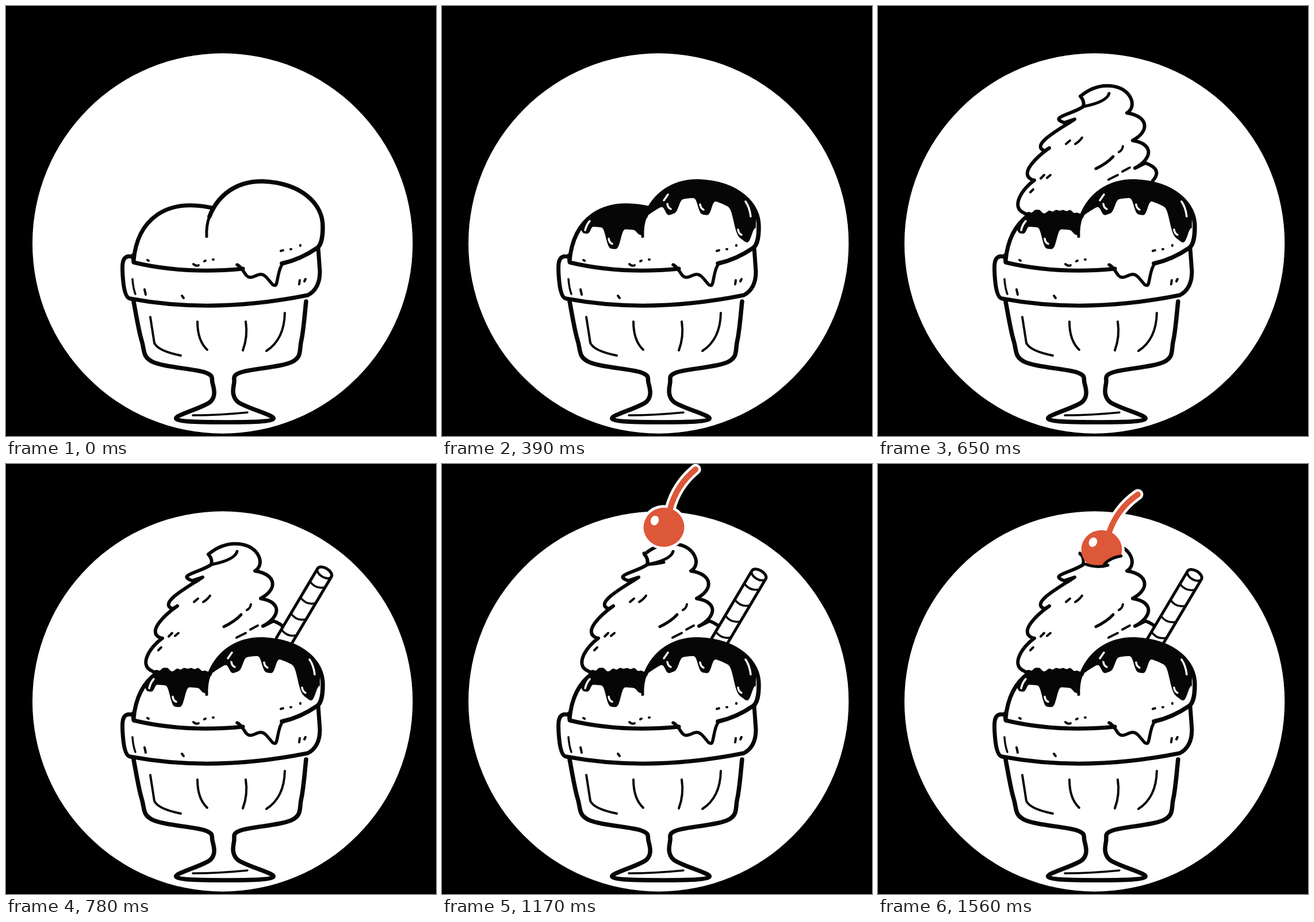
An HTML page with a canvas for the animation above (2.47 s loop, 748 by 748 pixels).

```html
<!DOCTYPE html>
<html lang="en">
<head>
<meta charset="utf-8">
<title>Ice cream sundae</title>
<style>
html, body { margin: 0; width: 100%; height: 100%; overflow: hidden; background: #000; }
canvas { display: block; width: 748px; height: 748px; }
</style>
</head>
<body>
<canvas id="stage" width="748" height="748"></canvas>
<script>
const ctx = document.getElementById('stage').getContext('2d');
const INK = '#060607', WHITE = '#fff', RED = '#dd5739';
const STEP = 130, LOOP = 2470, LAST_STEP = 12;

const asPath = shape => shape instanceof Path2D ? shape : new Path2D(shape);

function stroke(shape, width, color = INK) {
  ctx.lineWidth = width;
  ctx.strokeStyle = color;
  ctx.stroke(asPath(shape));
}

function fill(shape, color = WHITE) {
  ctx.fillStyle = color;
  ctx.fill(asPath(shape));
}

function isolated(paint) {
  ctx.save();
  paint();
  ctx.restore();
}

function ellipse(x, y, rx, ry, turn = 0) {
  const path = new Path2D();
  path.ellipse(x, y, rx, ry, turn, 0, Math.PI * 2);
  return path;
}

// Catmull-Rom curve through the given points.
function spline(pts) {
  const path = new Path2D();
  path.moveTo(...pts[0]);
  for (let i = 0; i < pts.length - 1; i++) {
    const b = pts[i], c = pts[i + 1];
    const a = pts[i - 1] || b, d = pts[i + 2] || c;
    path.bezierCurveTo(
      b[0] + (c[0] - a[0]) / 6, b[1] + (c[1] - a[1]) / 6,
      c[0] - (d[0] - b[0]) / 6, c[1] - (d[1] - b[1]) / 6, ...c);
  }
  return path;
}

// Scoops and the sauce hanging over them
const leftScoop = {
  edge: 'M222 443C228 375 275 330 366 353',
  close: 'L366 458L222 446Z',
  top: [300, 345], from: 237, to: 356,
  base: x => 386 + 0.08 * (x - 290),
  drips: [{ x: 250, length: 13, width: 9 }, { x: 298, length: 36, width: 14 }, { x: 349, length: 8, width: 11 }]
};
const rightScoop = {
  edge: 'M354 366C368 330 400 304 447 305C515 308 552 345 551 385C551 408 546 418 541 421Q512 441 480 448',
  close: 'L430 455L370 445L349 402Q348 382 354 366Z',
  top: [447, 302], from: 354, to: 546,
  base: x => 334 + 0.0045 * (x - 440) ** 2,
  drips: [{ x: 400, length: 21, width: 13 }, { x: 457, length: 28, width: 13 }, { x: 523, length: 42, width: 17 }]
};

const sauceEdge = (scoop, x) => scoop.drips.reduce(
  (y, drip) => y + drip.length * Math.exp(-(((x - drip.x) / drip.width) ** 4)), scoop.base(x));

// The sauce spreads from the top of the scoop and is cut off by its outline.
function drawSauce(scoop, grown) {
  const [cx, cy] = scoop.top;
  isolated(() => {
    ctx.clip(asPath(scoop.edge + scoop.close));
    ctx.translate(cx, cy);
    ctx.scale(0.6 + 0.4 * grown, grown);
    ctx.translate(-cx, -cy);
    const curtain = new Path2D();
    curtain.moveTo(scoop.from, cy - 40);
    for (let x = scoop.from; x <= scoop.to; x++) curtain.lineTo(x, sauceEdge(scoop, x));
    curtain.lineTo(scoop.to, cy - 40);
    fill(curtain, INK);
    for (const drip of scoop.drips) {
      const tip = sauceEdge(scoop, drip.x);
      if (drip.length > 15) stroke(`M${drip.x - 8} ${tip - 18}q1 7 6 9`, 3.5, WHITE);
    }
  });
}

function drawGleams() {
  stroke('M249 390Q251 381 257 374M393 328L386 338M528 340Q535 350 537 366', 3.5, WHITE);
}

// Whipped cream: stacked lobes, each drawn from its lower to its upper notch
const leftLobes = [[256, 361, 272, 303], [270, 303, 298, 247], [290, 252, 342, 197], [324, 203, 357, 175]];
const rightLobes = [[433, 186, 443, 234], [443, 234, 447, 282]];
const leftLobe = ([ax, ay, bx, by]) => `L${ax} ${ay}C${ax - 28} ${ay - 10} ${bx - 20} ${by + 14} ${bx} ${by}`;
const rightLobe = ([ax, ay, bx, by]) => `L${ax} ${ay}C${ax + 38} ${ay + 6} ${bx + 30} ${by - 16} ${bx} ${by}`;
const creamStart = 'M256 361';
const tornTop = 'Q325 234 365 226Q390 213 403 207l2-9 6 4 5-4 3 13 5 1 10-4Q434 220 428 231';
const curlTop = 'Q360 166 352 157C375 138 395 138 405 139C440 142 452 175 433 186';

const halfCream = {
  edge: creamStart + leftLobes.slice(0, 2).map(leftLobe).join('') + tornTop +
    'C450 232 488 246 467 266Q496 292 478 304',
  folds: 'M267 311Q300 296 362 286M395 254Q414 247 438 232',
  ticks: 'M366 274l16-8M276 290l4 4M293 288h10M406 271l3-6M411 272l3-6M401 302l14-9M438 283l9-7M455 271l12-5M269 337l1 1'
};
const fullCream = {
  edge: creamStart + leftLobes.map(leftLobe).join('') + curlTop + rightLobes.map(rightLobe).join('') +
    'L465 273Q496 284 478 304',
  folds: 'M357 175Q398 167 402 152M379 283Q398 274 409 262',
  ticks: 'M327 240l7-6M343 240Q350 236 355 229M419 254Q425 251 426 244M401 302l16-8M425 288l13-7M283 300l6-6M294 299l6-5M265 324l5-5'
};

function creamHem() {
  let hem = 'M352 364';
  for (let x = 346; x >= 256; x -= 6) hem += `L${x} ${360 + 3 * Math.sin(x * x)}`;
  return hem;
}

function drawCream({ edge, folds, ticks }) {
  const hem = creamHem();
  fill(edge + 'L440 330L360 352' + hem.replace('M', 'L'));
  stroke(edge, 6);
  stroke(hem, 5);
  stroke(folds, 5);
  stroke(ticks, 4);
}

// The wafer sinks in with a small damped bounce.
function drawWafer(age) {
  const n = Math.min(age, 4);
  const sink = 1 - Math.cos(1.9 * n) * Math.exp(-n / 2);
  isolated(() => {
    ctx.translate(554 - 3.5 * sink, 189 + 4.5 * sink);
    ctx.rotate(0.536);
    fill('M-14 0H14V140H-14Z');
    stroke('M-14 140V0A14 8 0 0 1 14 0V140', 5);
    stroke('M-14 0A14 8 0 0 0 14 0', 4);
    for (let y = 26; y < 140; y += 32.4) stroke(`M-14 ${y}Q2 ${y + 7} 14 ${y - 5}`, 3.5);
  });
}

function drawGlass() {
  const profile = [[222, 514], [236, 582], [255, 619], [345, 637], [359, 655], [356, 688], [296, 718]];
  const leaningMirror = ([x, y]) => [2 * (372 + (y - 514) * 0.042) - x, y];
  stroke(spline([...profile, [381, 724], ...profile.map(leaningMirror).reverse()]), 7.5);
  stroke('M222 437C200 430 201 450 204 480Q207 508 216 509Q360 536 525 503Q546 492 546 462L543 420', 7);
  stroke('M221 434L222 446Q310 467 412 457', 7);
  stroke('M402 450C414 456 415 472 425 472S442 460 453 472 463 486 468 486 472 458 482 447', 5.5);
  stroke('M251 541L258 586Q264 600 304 608M333 549Q333 582 350 598M417 549Q421 575 412 599M485 534Q484 580 453 600', 4);
  stroke('M325 712Q370 712 420 707M220 475Q221 490 225 501', 3.5);
  stroke('M241 493l2 9M306 504l3 4M511 477l-1 7M521 475l-2 4', 4);
  stroke('M246 442l2 1M326 449q4 4 9 2M345 444l2-1M360 441h1M478 426l4-1M495 423h1M512 416v1', 4);
}

// The cherry falls faster and faster, then rests behind a lip of cream.
function drawCherry(left) {
  const body = ellipse(389, 150, 35.5, 34);
  const stem = 'M402 120Q416 79 452 54';
  const posed = paint => isolated(() => {
    ctx.translate(389 - left, 149 - 6.5 * left * (left - 1));
    ctx.rotate(0.08 * Math.sin(left * Math.PI / 2));
    ctx.translate(-389, -150);
    paint();
  });
  posed(() => {
    stroke(stem, 19, WHITE);
    stroke(body, 9, WHITE);
  });
  stroke('M351 155Q359 163 357 175Q372 174 386 171', 5);
  posed(() => {
    stroke(stem, 10, RED);
    fill(body, RED);
    fill(ellipse(374, 137, 7, 8.5, 0.45));
  });
  if (left < 2) {
    fill('M357 173Q380 182 398 175Q404 163 424 160L432 170L420 190H365Z');
    stroke('M357 173Q380 182 400 176M394 174Q404 163 423 160', 5);
  }
  if (left === 2) {
    for (let i = 0; i < 4; i++) stroke(`M${421 - 10 * i} ${36 + 11 * i}l-1 8`, 2, WHITE);
  }
}

function draw(step) {
  ctx.fillStyle = '#000';
  ctx.fillRect(0, 0, 748, 748);
  fill(ellipse(376.7, 413, 330.7, 330.7));

  const grown = Math.min(1, 0.18 + 0.275 * step);
  if (step >= 1) drawSauce(leftScoop, grown);
  stroke(leftScoop.edge, 7);
  if (step >= 4) drawCream(step === 4 ? halfCream : fullCream);
  if (step >= 6) drawWafer(step - 6);

  fill(rightScoop.edge + rightScoop.close);
  if (step >= 1) drawSauce(rightScoop, grown);
  stroke(rightScoop.edge, 7.5);
  stroke('M349 401Q348 382 354 366', 5);
  if (step >= 3) drawGleams();

  drawGlass();
  if (step >= 9) drawCherry(LAST_STEP - step);
}

ctx.lineCap = ctx.lineJoin = 'round';
let shown = -1;
function tick() {
  const step = Math.min(LAST_STEP, Math.floor(performance.now() % LOOP / STEP));
  if (step !== shown) draw(shown = step);
  requestAnimationFrame(tick);
}
tick();
</script>
</body>
</html>
```
